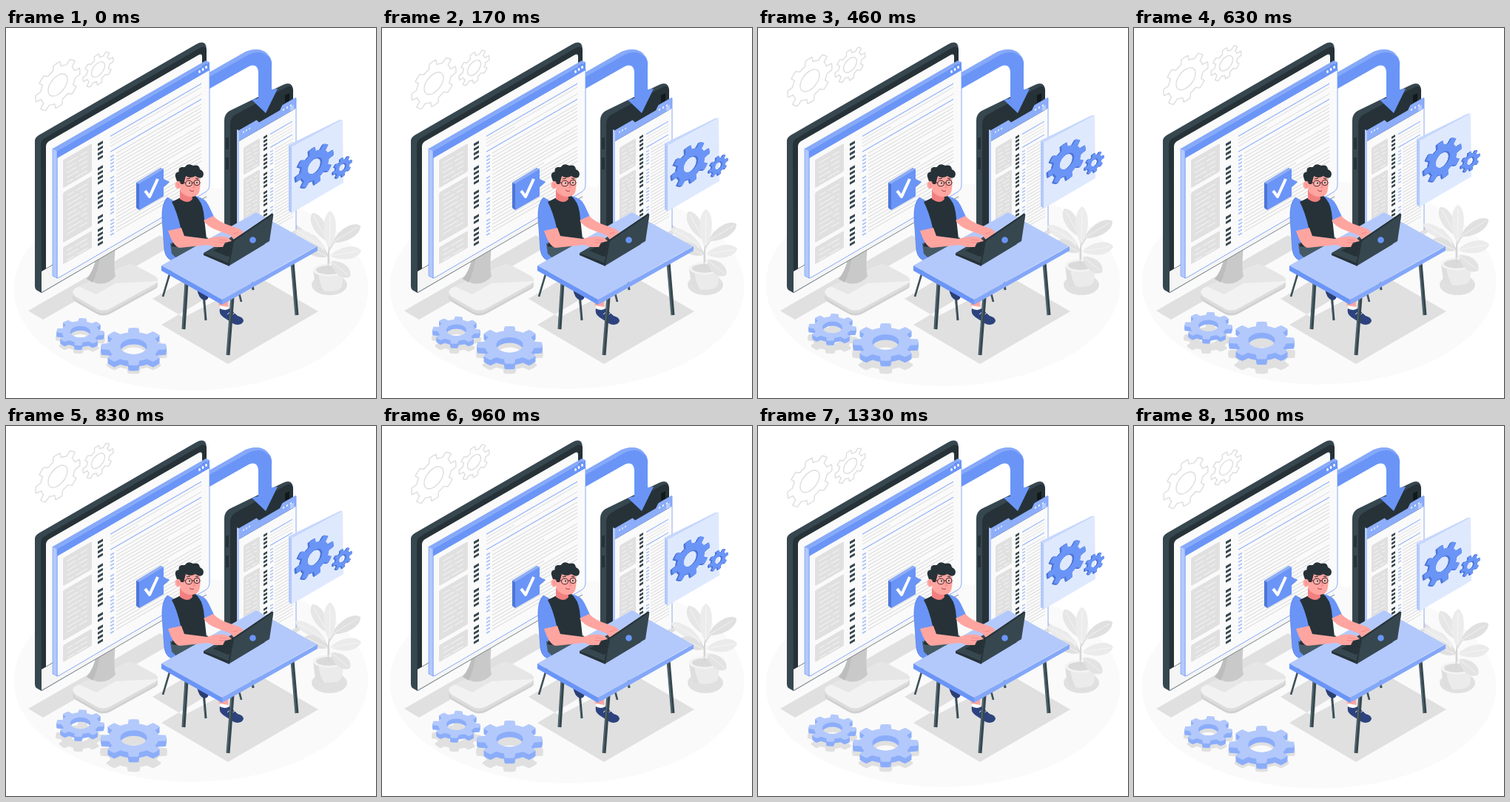
Recreate the animation shown at these times as an HTML page with a canvas. Size 500x500 px, loop 1.54 s.

```html
<!DOCTYPE html>
<html lang="en">
<head>
<meta charset="utf-8">
<title>Isometric workspace</title>
<style>
html, body { margin: 0; width: 100%; height: 100%; overflow: hidden; background: #fff; }
canvas { display: block; width: 100vw; height: 100vh; }
</style>
</head>
<body>
<canvas id="stage" width="500" height="500"></canvas>
<script>
const ctx = document.getElementById('stage').getContext('2d');
const BLUE = '#6a95f7', SKY = '#8cadf9', PALE = '#b3c9fc', DEEP = '#4d76d6', MIST = '#dfe9fe';
const INK = '#263238', SLATE = '#37474f', STEEL = '#455a64';
const SHADE = '#e0e0e0', PAPER = '#fafafa', SKIN = '#ffa5a0', SKIN_DARK = '#f27f7f';
const WALL = [1, -0.577, 0, 1, 0, 0], FLOOR = [1, 0, 0, 0.577, 0, 0];
const LOOP = 1540, RISE = 1500, FPS = 24;

function shape(d, fill, stroke, width = 1) {
  const path = new Path2D(d);
  if (fill) { ctx.fillStyle = fill; ctx.fill(path); }
  if (stroke) { ctx.strokeStyle = stroke; ctx.lineWidth = width; ctx.stroke(path); }
}

function oval(x, y, rx, ry, fill, stroke, width = 1) {
  ctx.beginPath();
  ctx.ellipse(x, y, rx, ry, 0, 0, Math.PI * 2);
  if (fill) { ctx.fillStyle = fill; ctx.fill(); }
  if (stroke) { ctx.strokeStyle = stroke; ctx.lineWidth = width; ctx.stroke(); }
}

function box(x, y, w, h, fill) {
  ctx.fillStyle = fill;
  ctx.fillRect(x, y, w, h);
}

function shifted(x, y, draw) {
  ctx.save();
  ctx.translate(x, y);
  draw();
  ctx.restore();
}

function onWall(x, y, draw) {
  shifted(x, y, () => { ctx.transform(...WALL); draw(); });
}

function gearPath(plane, outer, inner, hole, teeth, turn) {
  const p = new Path2D(), step = Math.PI * 2 / teeth;
  for (let i = 0; i < teeth; i++) {
    const a = turn + i * step;
    p.arc(0, 0, outer, a - step * 0.19, a + step * 0.19);
    p.arc(0, 0, inner, a + step * 0.29, a + step * 0.71);
  }
  p.closePath();
  p.moveTo(hole, 0);
  p.arc(0, 0, hole, 0, Math.PI * 2);
  const out = new Path2D();
  out.addPath(p, new DOMMatrix(plane));
  return out;
}

function solidGear(x, y, path, dx, dy, side, face) {
  const n = 8;
  for (let i = n; i >= 0; i--) {
    shifted(x + dx * i / n, y + dy * i / n, () => {
      ctx.fillStyle = i ? side : face;
      ctx.fill(path, 'evenodd');
    });
  }
}

const gears = {
  outlineBig: gearPath(WALL, 30, 23.5, 13, 8, -0.05),
  outlineSmall: gearPath(WALL, 20.5, 15.5, 9, 8, -0.1),
  panelBig: gearPath(WALL, 25.5, 19, 9.8, 8, -0.15),
  panelSmall: gearPath(WALL, 12.8, 9.5, 4.8, 8, -0.1),
  floorBig: gearPath(FLOOR, 44, 34, 18, 8, 0),
  floorSmall: gearPath(FLOOR, 32, 25, 13.5, 8, 0.1)
};

// Repeatable pseudo-random value in 0..1
const noise = n => { const s = Math.sin(n * 12.9898) * 43758.5453; return s - Math.floor(s); };

function textBlock(x, y, w, h, gap, seed) {
  ctx.fillStyle = SHADE;
  ctx.beginPath();
  ctx.roundRect(x, y, w, h, 2);
  ctx.fill();
  for (let v = y + gap, row = seed; v < y + h - 3; v += gap, row++) {
    const cut = w * (0.3 + noise(row) * 0.4);
    box(x + w * 0.14, v, cut - w * 0.14, 1.5, '#f0f0f0');
    box(x + cut + 3, v, Math.max(0, w * 0.84 - cut - 3), 1.5, '#f0f0f0');
  }
}

function backdrop(dy) {
  oval(250, 352.5 + dy, 239.5, 137.5, PAPER);
  ctx.strokeStyle = '#dedede';
  ctx.lineWidth = 1.4;
  shifted(70, 77 + dy, () => ctx.stroke(gears.outlineBig));
  shifted(124.5, 56 + dy, () => ctx.stroke(gears.outlineSmall));
}

function shadows() {
  shape('M30 382 L50 394 L228 292 L208 280 Z', SHADE);
  shape('M210 401 L300 454 L422 383 L330 330 Z M198 366 L245 338 L290 365 L240 391 Z', SHADE);
  shape('M384 260 L402 273 L378 288 Z', SHADE);
  oval(437, 347, 24, 14, SHADE);
  [['floorBig', 172.5, 440.5], ['floorSmall', 100.5, 420]].forEach(([name, x, y]) => {
    shifted(x, y, () => {
      ctx.fillStyle = ctx.strokeStyle = SHADE;
      ctx.lineWidth = 3;
      ctx.fill(gears[name], 'evenodd');
      ctx.stroke(gears[name]);
    });
  });
}

function monitor() {
  const base = 'M93 352 Q87 357 94 363 L122 379 Q131 384 141 379 L201 346 Q209 341 201 335 L177 322 Q168 317 159 322 Z';
  shifted(0, 7, () => shape(base, '#d0d0d0'));
  shifted(0, 4, () => shape(base, '#dcdcdc'));
  shape(base, '#f2f2f2');
  shape('M93 352 L159 322 Q168 317 177 322 L201 335 Q206 338 205 342 L148 345 L122 360 L98 349 Z', '#e6e6e6');
  shape('M122 310 L148 296 Q145 323 148 336 Q137 348 122 345 L109 339 Q119 327 122 310 Z', '#c9c9c9');
  shape('M122 310 L127 308 Q124 330 117 344 L109 339 Q119 327 122 310 Z', '#bdbdbd');

  shape('M39 153 Q39 148 44 145 L257 22 Q270 15 271 28 V227 L48 358 L41 354 Q39 352 39 349 Z', SLATE);
  shape('M47 158 Q47 152 52 149 L262 27 Q271 22 271 32 V227 L48 358 Z', INK);
  shape('M54 160 Q54 156 58 153 L261 36 Q265 34 265 39 V202 L54 325 Z', PAPER);
  shape('M48 329 L271 200 V228 L48 358 Z', '#f5f5f5');
  shape('M48 357.5 L271 228', null, STEEL, 0.7);
}

function desktopWindow() {
  shape('M69 175 L275 56 V212 Q275 219 269 222 L72 337 L69 338 Z', PAPER, BLUE, 0.8);
  shape('M63 163 L69 166 V338 L63 335 Z', PALE, BLUE, 0.6);
  shape('M63 163 L270 44 L275 46 L69 166 Z', '#86a9f9');
  shape('M69 166 L275 46 V57 L69 176 Z', BLUE);
  [[261.5, 59], [266, 56], [270.5, 53]].forEach(([x, y]) => oval(x, y, 1.4, 1.9, '#fff'));

  onWall(69, 176, () => {
    [[7, 38], [51, 68], [125, 23]].forEach(([v, h], i) => textBlock(8, v, 39, h, 6.5, i * 31 + 3));
    [12, 45, 78, 111, 128].forEach(v => {
      const count = v === 111 ? 2 : 4;
      for (let i = 0; i < count; i++) box(55, v + i * 6.4, 7, 3.4, SLATE);
    });
    box(72, 11, 123, 1.5, '#9bb8fa');
    [16, 20.5, 25].forEach((v, i) => box(72, v, [123, 38, 123][i], 1, '#dcdcdc'));
    box(72, 32, 123, 1.5, '#9bb8fa');
    for (let i = 0; i < 23; i++) {
      const v = 39 + i * 4.8;
      if (i % 6 !== 5) box(72, v, 5, 2, '#a7c0fb');
      box(80, v, i % 6 === 5 ? 70 : 115, 1, '#d6d6d6');
    }
  });
}

function badge() {
  shape('M176 209 L209 189 L213 191 V205 L221 208 L213 215 V227 L180 246 L176 243 Z', DEEP);
  shape('M176 209 L209 189 L213 191 L180 211 Z', SKY);
  shape('M180 211 L213 191 V204 L221 208 L213 215 V227 L180 246 Z', BLUE);
  shape('M188 220 L194 228 L205 204', null, '#fff', 4);
}

function arrow() {
  shape('M275 60 L324 32 Q347 23 357 40 Q360 46 359 52 V83 L367 82 L351 115 L332 97 L341 95 V60 Q340 47 328 52 L275 82 Z', BLUE);
  shape('M275 60 L324 32 Q347 23 357 40 L352 37 Q344 29 328 36 L275 66 Z', '#86a9f9');
}

function phone() {
  shape('M295 125 Q295 116 302 112 L374 77 Q387 71 388 84 V270 L304 318 L295 312 Z', SLATE);
  shape('M303 130 Q303 121 310 117 L379 80 Q388 76 388 86 V270 L303 318 Z', INK);
  shape('M299 148 V164 M299 175 V191', null, INK, 4);
  shape('M377 91 L383 88 V98 L377 101 Z', '#11191d');
  onWall(315, 153, () => {
    box(0, 0, 77, 164, PAPER);
    box(0, -15, 77, 15, SKY);
    shape('M23 -16 L27 -10 H55 L59 -16 Z', INK);
    [6, 10, 14].forEach(u => oval(u, -9, 1.1, 1.2, MIST));
    [60, 65, 70].forEach(u => oval(u, -8, 1.1, 1.2, '#fff'));
    [-5, -3, -1].forEach(v => box(69, v - 1, 5, 0.8, '#fff'));
    [[12, 37], [54, 65], [124, 35]].forEach(([v, h], i) => textBlock(6, v, 22, h, 5.5, i * 19 + 7));
    for (let i = 0; i < 20; i++) {
      box(33, 13 + Math.floor(i / 4) * 25 + i % 4 * 5.4, 5, 3, SLATE);
    }
    box(42, 14, 30, 1.4, '#9bb8fa');
    box(42, 32, 30, 1.4, '#9bb8fa');
    [19, 23, 27].forEach(v => box(42, v, 30, 0.8, '#dcdcdc'));
    for (let i = 0; i < 26; i++) {
      const v = 38 + i * 4.2;
      if (i % 6 !== 5) box(42, v, 4, 1.6, '#a7c0fb');
      box(48, v, 25, 0.9, '#d6d6d6');
    }
  });
  shape('M312 137 L315 138.5 V317 L312 315 Z', PALE);
  shape('M392 95 V273', null, BLUE, 0.8);
}

function panel() {
  shape('M382 158 L451 124 L455 124 L386 161 Z', '#c6d7fd');
  shape('M382 158 L386 161 V250 L382 247 Z', PALE);
  shape('M386 161 L455 124 L456 209 L386 250 Z', MIST);
  solidGear(417.5, 186, gears.panelBig, -2.5, 1.5, DEEP, BLUE);
  solidGear(455, 188, gears.panelSmall, -2, 1, DEEP, BLUE);
}

function leaf(x0, y0, x1, y1, width, fill) {
  const dx = x1 - x0, dy = y1 - y0, len = Math.hypot(dx, dy);
  const nx = -dy / len * width, ny = dx / len * width;
  const at = (k, side) => `${x0 + dx * k + nx * side} ${y0 + dy * k + ny * side}`;
  shape(`M${x0} ${y0} C${at(0.3, 1)} ${at(0.85, 1.2)} ${x1} ${y1} C${at(0.85, -1.2)} ${at(0.3, -1)} ${x0} ${y0} Z`, fill);
  shape(`M${x0} ${y0} L${at(0.9, 0)}`, null, PAPER, 0.7);
}

function plant() {
  shape('M437 324 Q435 290 440 270 M436 310 Q424 285 414 280 M437 300 Q445 285 455 278', null, '#d5d5d5', 1.4);
  leaf(434, 288, 414, 250, 10, '#e6e6e6');
  leaf(441, 290, 479, 267, 10, SHADE);
  leaf(432, 298, 391, 273, 8, '#ebebeb');
  leaf(437, 299, 438, 247, 10, '#ececec');
  leaf(438, 308, 480, 301, 10, '#ebebeb');
  leaf(435, 309, 404, 294, 9, SHADE);
  shape('M415 327 L418 349 Q421 356 436 356 Q451 356 454 349 L457 327 Z', '#ebebeb');
  shape('M415 327 L418 349 Q421 356 430 356 Q423 345 422 330 Z', '#dedede');
  oval(436, 327, 21, 8.5, '#f3f3f3');
  oval(436, 327, 17, 6, '#dadada');
  shape('M436 327 Q434 310 437 296', null, '#d5d5d5', 1.5);
  leaf(439, 315, 465, 336, 10, '#e3e3e3');
}

function leg(x0, y0, x1, y1, w) {
  shape(`M${x0} ${y0} L${x1} ${y1}`, null, SLATE, w);
  shape(`M${x0 - w * 0.25} ${y0} L${x1 - w * 0.25} ${y1}`, null, '#56707c', w * 0.25);
}

function head() {
  shape('M235 218 L251 222 L252 231 Q246 239 235 231 Z', SKIN_DARK);
  shape('M233 200 L260 198 Q264 208 262 217 Q261 228 252 228 Q243 229 236 221 Z', SKIN);
  shape('M231 207 Q226 196 234 194 Q233 187 242 188 Q247 182 253 186 Q261 184 262 191 Q269 194 266 201 Q262 205 256 200 Q249 204 243 200 L240 211 L236 211 Z', INK);
  [[233, 199, 4.3], [238, 192.5, 4.5], [247, 189.5, 5], [256, 190.5, 4.5], [262, 197, 4.2]].forEach(([x, y, r]) => oval(x, y, r, r, INK));
  oval(232.5, 212, 4, 5.3, SKIN);
  shape('M231 210 Q234 211 234 215', null, SKIN_DARK, 0.8);
  oval(247, 210, 4.3, 3.8, '#ffb9b3', '#4b252b', 1);
  oval(258, 209, 4, 3.7, '#ffb9b3', '#4b252b', 1);
  shape('M235 209 L243 209 M251 209 L254 209', null, '#4b252b', 1);
  oval(248, 209.5, 0.9, 1.3, INK);
  oval(258, 209, 0.9, 1.3, INK);
  shape('M244 204 L249 203 M256 203 L260 204', null, INK, 1.1);
  shape('M253 210 L255 216 L252 216', null, SKIN_DARK, 0.9);
  shape('M248 219 Q251 222 254 220', null, '#a94249', 1);
}

function seatedBody() {
  leg(223, 326, 212, 363, 2.6);
  leg(267, 360, 270, 395, 3);
  leg(314, 355, 318, 370, 2.6);
  leg(332, 340, 334, 354, 3);
  shape('M218 229 Q210 237 211 258 L214 300 Q216 314 230 316 L240 306 L229 235 Z', BLUE, DEEP, 0.6);
  shape('M222 291 L272 283 L286 300 L240 320 L224 305 Z', STEEL);
  shape('M258 352 L274 360 Q274 368 268 368 Q260 366 258 352 Z', '#2b3f73');
  shape('M285 366 L300 366 L300 379 L289 377 Z', SKIN);
  shape('M289 375 L300 377 L302 382 L289 380 Z', '#fff');
  shape('M289 379 Q287 386 294 391 L308 400 Q318 403 321 396 Q321 391 313 389 L302 379 Q296 383 289 379 Z', '#2d437e');
  shape('M299 387 L305 382 M303 390 L309 385', null, '#fff', 0.9);

  shape('M224 236 Q213 242 217 258 L219 275 L238 270 L238 240 Z', BLUE);
  shape('M256 227 Q270 230 274 240 L281 255 Q276 260 267 261 L254 240 Z', BLUE);
  shape('M224 235 L238 228 L256 227 Q265 235 267 249 L271 285 Q252 299 223 295 L236 270 Q231 248 224 235 Z', INK);
  head();
}

function desk() {
  leg(244, 344, 240, 407, 5);
  leg(387, 317, 393, 388, 5);
  leg(306, 364, 300, 442, 5);
  shape('M210 321 L338 249 L420 295 L292 367 Z', PALE);
  shape('M210 321 L292 367 V374 L210 328 Z', BLUE);
  shape('M292 367 L421 295 V301 L292 374 Z', '#83a7f9');
}

function laptopAndArms() {
  shape('M267 304 L312 278 L350 292 L302 321 Z', SLATE);
  shape('M267 304 L302 318 V322 L267 307 Z', INK);
  shape('M280 301 L313 282 L332 291 L300 309 Z', INK);
  shape('M267 260 L280 254 Q288 262 300 266 L314 271 Q323 275 319 278 L308 286 L303 280 L287 274 Q272 269 267 260 Z', SKIN);
  shape('M219 274 L237 270 L241 281 L272 285 Q288 279 300 283 L305 288 L296 290 L293 296 L282 296 L273 293 L235 297 Q226 296 219 274 Z', SKIN);
  shape('M288 286 L298 287 M288 290 L296 290 M307 278 L314 276', null, SKIN_DARK, 0.8);
  shape('M306 287 L359 251 Q362 250 361 255 L356 288 L300 321 Z', SLATE);
  shape('M306 287 L359 251 L361 252 L308 288 L302 320 L300 321 Z', INK);
  oval(333.5, 286.5, 4.3, 4.3, BLUE);
}

function floorGears(dy) {
  solidGear(100.5, 410.5 + dy, gears.floorSmall, 0, 6, SKY, PALE);
  solidGear(172.5, 430.5 + dy, gears.floorBig, 0, 7.5, SKY, PALE);
}

function draw(now) {
  const tick = Math.floor((now % LOOP + 5) * FPS / 1000);
  const time = Math.min(tick * 1000 / FPS, RISE);
  const dy = -10 * (1 - Math.abs(1 - 2 * time / RISE));

  box(0, 0, 500, 500, '#fff');
  ctx.lineJoin = 'round';
  backdrop(dy);
  shadows();
  monitor();
  desktopWindow();
  badge();
  phone();
  arrow();
  shifted(0, dy, plant);
  shifted(0, dy, panel);
  seatedBody();
  desk();
  laptopAndArms();
  floorGears(dy);
  requestAnimationFrame(draw);
}
requestAnimationFrame(draw);
</script>
</body>
</html>
```
